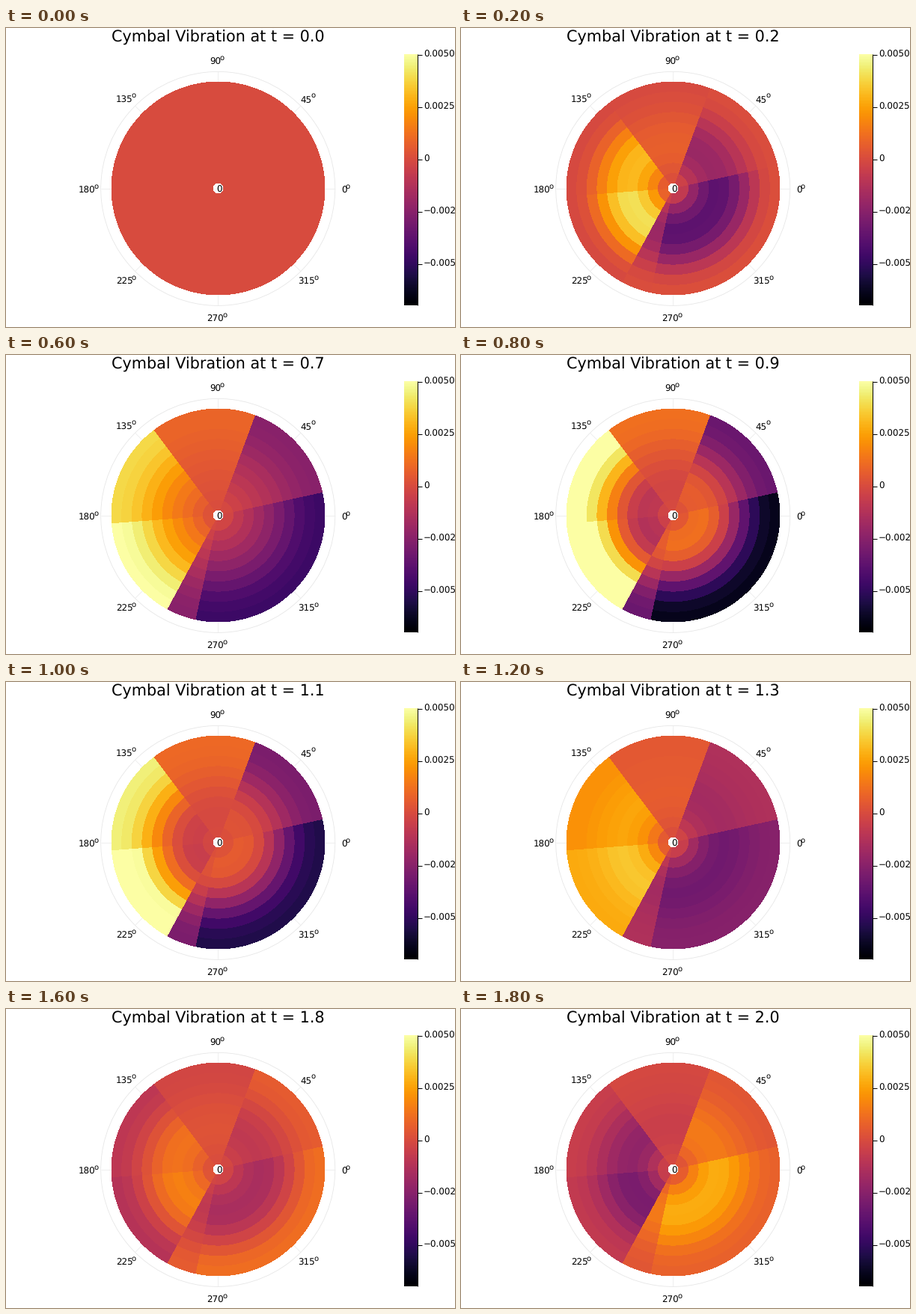
Animation of 600 by 400 pixels, one loop 2 s. Source, as a matplotlib script:

```python
import numpy as np
import matplotlib.pyplot as plt
from matplotlib.animation import FuncAnimation
from matplotlib.patches import Circle

W, H, DPI = 600, 400, 100
PT = 72 / DPI                      # points per pixel
CX, CY = 283.5, 214.5              # disc centre
GX, GY, GRID = 283.2, 214.9, 156.5  # polar grid
CELLS, FRAMES = 10, 10
UNIT = 142.9 / (CELLS + 0.5)       # pixels per ring
LOW, HIGH = -7.0, 5.0              # colour limits, thousandths
SMALL, TITLE, SUP = 11.9, 20.8, 10.0

plt.rcParams["font.family"] = "DejaVu Sans"
plt.rcParams["text.hinting"] = "none"
fig = plt.figure(figsize=(W / DPI, H / DPI), dpi=DPI, facecolor="white")
ax = fig.add_axes([0, 0, 1, 1])
ax.axis("off")


def label(x, y, text, size=SMALL, ha="left"):
    return ax.text(x, y, text, fontsize=size * PT, ha=ha, va="baseline",
                   color="black", zorder=5)


def line(xs, ys, color, width):
    ax.plot(xs, ys, color=color, lw=width * PT, solid_capstyle="butt", zorder=1)


def bessel1(x):
    tau = np.linspace(0, 2 * np.pi, 64, endpoint=False)
    x = np.asarray(x)[..., None]
    return np.cos(tau - x * np.sin(tau)).mean(axis=-1)


# Radial modes with a free rim: wave number, angular frequency, amplitude
MODES = [(1.841, 1.77, 8.4), (5.331, 5.0, 6.0), (8.536, 7.7, -0.4)]
radii = (np.arange(CELLS) + 0.5) / (CELLS - 0.5)
shapes = [bessel1(k * radii) for k, _, _ in MODES]

# Cells are one unit deep and one radian wide; later sectors cover earlier ones
px, py = np.meshgrid(np.arange(W) + 0.5 - CX, np.arange(H) + 0.5 - CY)
depth = np.hypot(px, py) / UNIT
outside = (depth < 0.5) | (depth > CELLS + 0.5)
ring = np.clip(np.rint(depth), 1, CELLS).astype(int) - 1
last = CELLS + 0.5
turn = last - np.mod(last - np.arctan2(-py, px), 2 * np.pi)
sector = np.rint(turn) - 1
lobes = np.cos(sector * 2 * np.pi / (CELLS - 1))


def field(t):
    profile = sum(a * s * np.sin(w * t)
                  for s, (_, w, a) in zip(shapes, MODES))
    return np.ma.array(profile[ring] * lobes, mask=outside)


# Polar grid and degree labels
ax.add_patch(Circle((GX, GY), GRID, fill=False, ec="#e6e6e6", lw=0.8 * PT,
                    zorder=1))
for deg in range(0, 360, 45):
    c, s = np.cos(np.radians(deg)), np.sin(np.radians(deg))
    line([GX, GX + GRID * c], [GY, GY - GRID * s], "#ececec", 0.8)
    digits = 0.636 * SMALL * len(str(deg))
    left = 282.5 + 172 * c - (digits + 5.5) / 2
    base = 217 - 172 * s + 4.3
    label(left, base, str(deg))
    label(left + digits - 1.6, base - 6.4, "o", SUP)
label(285.2, 219.6, "0", ha="center")

# Colour bar
ramp = np.linspace(1, 0, 336)[:, None]
ax.imshow(ramp, cmap="inferno", extent=(532, 550, 371, 35), aspect="auto",
          interpolation="nearest", zorder=2)
line([550, 550], [35, 371], "black", 1)
ticks = ["0.0050", "0.0025", "0", "\u22120.0025", "\u22120.0050"]
for i, text in enumerate(ticks):
    y = 35 + 70 * i
    line([550, 556], [y + 0.5, y + 0.5], "black", 1)
    label(558, y + 4.3, text)

disc = ax.imshow(field(0), cmap="inferno", vmin=LOW, vmax=HIGH,
                 extent=(0, W, H, 0), aspect="auto",
                 interpolation="nearest", zorder=3)
title = label(283.3, 18.2, "", TITLE, "center")
ax.set_xlim(0, W)
ax.set_ylim(H, 0)


def draw(i):
    t = 2 * i / (FRAMES - 1)
    disc.set_data(field(t))
    title.set_text(f"Cymbal Vibration at t = {t:.1f}")
    return disc, title


anim = FuncAnimation(fig, draw, frames=FRAMES, interval=200, repeat=True,
                     repeat_delay=0)
plt.show()
```
